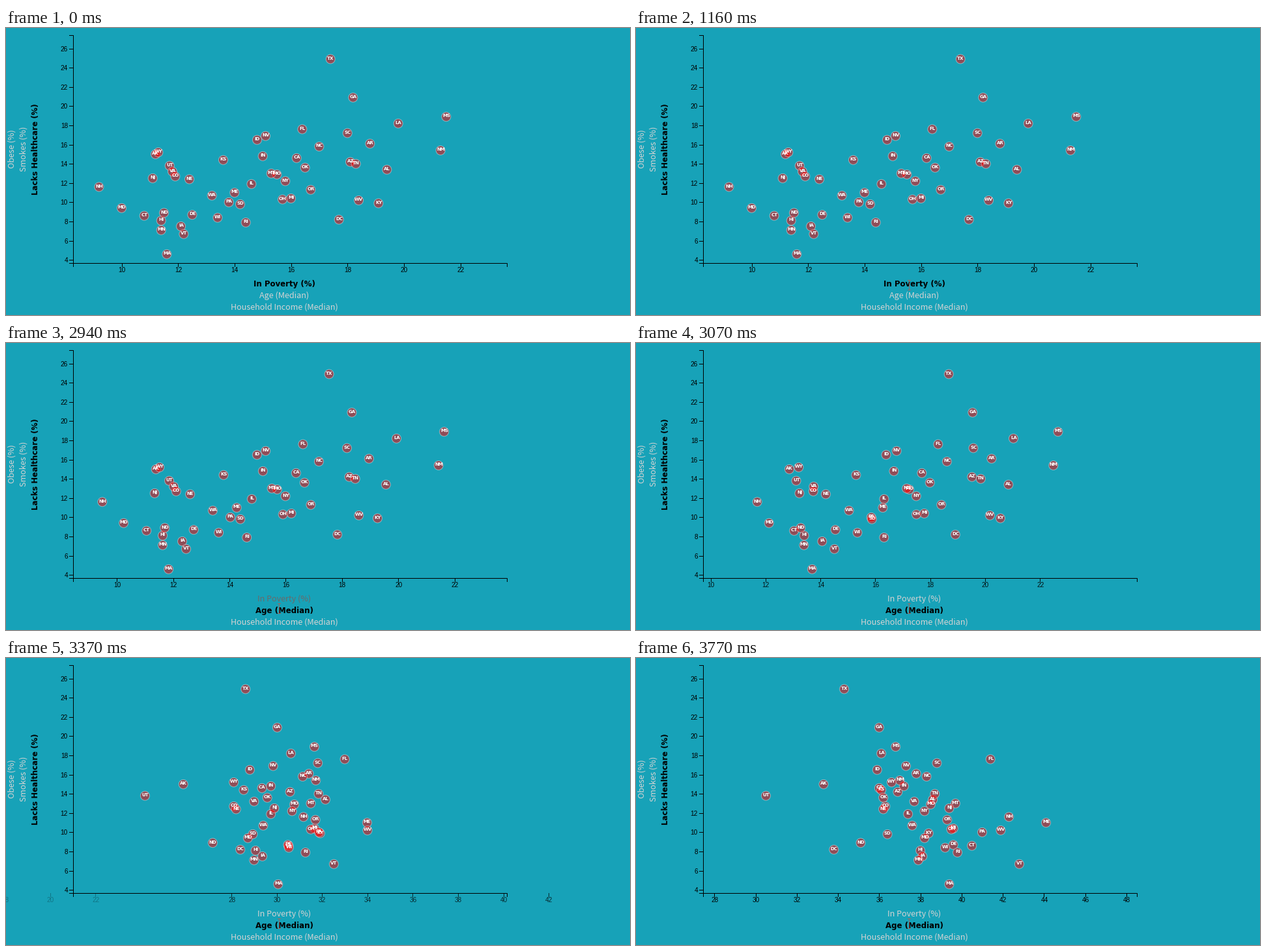
Recreate the animation shown at these times as a matplotlib script. Size 958x442 px, loop 8000 ms.

```python
import numpy as np
import matplotlib.pyplot as plt
from matplotlib.animation import FuncAnimation
from matplotlib.patches import Circle, Polygon, Rectangle

W, H, DPI = 958, 442, 100
PX = 72 / DPI
INTERVAL, FRAMES = 40, 200
TEAL, LIGHT = "#17a2b8", 211 / 255
LEFT, RIGHT, TOP, BOTTOM = 103, 769, 11, 362
RADIUS = 7
CAPTURE = 150            # the pointer moves once per this many ms
SWITCH = 2940            # the x axis changes from poverty to age

# states from lowest to highest in each measure
BY_POVERTY = ("NH MD CT NJ AK WY HI MN ND MA UT VA CO IA VT NE DE WA WI KS PA ME SD RI IL ID IN "
              "NV MT MO OH NY MI CA FL OK OR NC TX DC SC AZ GA TN WV AR KY AL LA NM MS")
BY_UNINSURED = ("MA VT MN IA RI HI DC WI CT DE ND MD SD KY PA WV OH MI WA ME OR NH IL NY NE NJ CO "
                "MO MT VA AL OK UT TN AZ KS CA IN AK WY NM NC AR ID NV SC FL LA MS GA TX")
BY_AGE = ("UT AK DC TX ND ID CA GA LA KS NE OK CO SD WY MS AZ NM IN NV IL WA VA AR MN HI IA "
          "NY MD NC KY MO AL TN SC WI OR MA NJ OH DE MI MT RI CT PA FL WV NH VT ME")
STATES = sorted(BY_AGE.split())


def spread(ranking, curve):
    """Value of each state, read off a rank-to-value curve given by a few points."""
    order = ranking.split()
    ranks = [order.index(s) for s in STATES]
    return np.round(np.interp(ranks, list(curve), list(curve.values())), 1)


POVERTY = spread(BY_POVERTY, {0: 9.2, 2: 10.8, 3: 11.1, 11: 11.8, 16: 12.5, 17: 13.2, 25: 14.8,
                              36: 16.7, 40: 18, 44: 18.4, 48: 19.8, 49: 21.3, 50: 21.5})
UNINSURED = spread(BY_UNINSURED, {0: 4.6, 1: 6.7, 4: 7.9, 10: 8.9, 12: 9.8, 17: 10.4, 23: 12.2,
                                  29: 13.2, 40: 15.4, 46: 17.6, 48: 18.9, 49: 20.9, 50: 24.9})
AGE = spread(BY_AGE, {0: 30.5, 1: 33.3, 3: 34.3, 5: 35.9, 12: 36.3, 16: 36.9, 22: 37.7,
                      34: 38.8, 35: 39.2, 43: 39.8, 44: 40.5, 49: 42.8, 50: 44.1})


def linear(value, start, end, low, high):
    return start + (value - low) / (high - low) * (end - start)


def poverty_x(v):
    return linear(v, LEFT, RIGHT, POVERTY.min() * .9, POVERTY.max() * 1.1)


def age_x(v):
    return linear(v, LEFT, RIGHT, AGE.min() * .9, AGE.max() * 1.1)


def uninsured_y(v):
    return linear(v, BOTTOM, TOP, UNINSURED.min() * .8, UNINSURED.max() * 1.1)


def crisp(v):
    return np.floor(v + .5) + .5


def progress(ms):
    if ms < SWITCH:
        return 0
    step = (ms - SWITCH + 10) // 140
    t = min(.143 + .15 * step, 1)
    return 4 * t ** 3 if t < .5 else 1 - 4 * (1 - t) ** 3


def pointer_y(ms):
    captured = 130 + (ms - 130) // CAPTURE * CAPTURE
    path = {130: 436, 280: 419, 430: 406, 580: 404, 880: 393, 1160: 395, 1310: 403, 1630: 409}
    return np.interp(captured, list(path), list(path.values()))


def hovered(ms):
    y = pointer_y(ms)
    return "age" if 402 <= y < 418 else "income" if 418 <= y < 435 else None


def hover_amount(name, ms):
    """Half way through the fade in the step after the pointer enters or leaves."""
    return ((hovered(ms) == name) + (hovered(ms - CAPTURE) == name)) / 2


fig = plt.figure(figsize=(W / DPI, H / DPI), dpi=DPI, facecolor=TEAL)
ax = fig.add_axes([0, 0, 1, 1])
ax.set(xlim=(0, W), ylim=(H, 0))
ax.axis("off")
svg_area = Rectangle((0, 0), 838, H, transform=ax.transData)


def line(xs, ys, color="black", **kw):
    return ax.plot(xs, ys, color=color, lw=PX, snap=False, solid_capstyle="butt",
                   solid_joinstyle="miter", **kw)[0]


def text(x, y, s, size, family, **kw):
    kw = {"ha": "center", "va": "baseline", "rotation_mode": "anchor", **kw}
    return ax.text(x, y, s, fontsize=size * PX, family=family, **kw)


def style(item, active, hover=0):
    item.set_family("DejaVu Sans" if active else "Noto Sans CJK JP")
    item.set_fontweight("bold" if active else "normal")
    item.set_fontsize((11.8 if active else 12.6) * PX)
    item.set_color("black" if active else (LIGHT * (1 - hover),) * 3)


def label(x, y, s, active=False, **kw):
    item = text(x, y, s, 12, "DejaVu Sans", **kw)
    style(item, active)
    return item


# axes
line([LEFT - 6, LEFT + .5, LEFT + .5, LEFT - 6], [TOP + .5, TOP + .5, BOTTOM + .5, BOTTOM + .5])
line([LEFT + .5, LEFT + .5, RIGHT + .5, RIGHT + .5], [BOTTOM + 6, BOTTOM + .5, BOTTOM + .5, BOTTOM + 6])
for value in range(4, 27, 2):
    y = crisp(uninsured_y(value))
    line([LEFT - 6, LEFT], [y, y])
    text(95, y + 3.3, str(value), 10, "Liberation Sans", ha="right")


def make_ticks(values):
    ticks = []
    for v in values:
        mark = line([0, 0], [BOTTOM, BOTTOM + 6])
        name = text(0, 376.5, str(v), 10, "Liberation Sans", clip_on=True)
        for part in (mark, name):
            part.set_clip_path(svg_area)
        ticks.append((v, mark, name))
    return ticks


old_ticks = make_ticks(range(10, 23, 2))
new_ticks = make_ticks(range(28, 49, 2))

# axis titles
poverty_label = label(427.5, 398, "In Poverty (%)", True)
age_label = label(427.5, 416, "Age (Median)")
income_label = label(427.5, 434, "Household Income (Median)")
label(13, 186.5, "Obese (%)", rotation=90)
label(31, 186.5, "Smokes (%)", rotation=90)
label(49, 186.5, "Lacks Healthcare (%)", True, rotation=90)

# bubbles; one colour per bubble keeps their centres off the pixel grid
cy = uninsured_y(UNINSURED)
start_x, end_x = poverty_x(POVERTY), age_x(AGE)
bubbles = ax.scatter(start_x, cy, s=(2 * RADIUS * PX) ** 2, facecolor=[(1, 0, 0, .52)] * len(cy),
                     edgecolor=[(.89, .89, .89, .5)] * len(cy), linewidth=PX, zorder=3)
names = [text(x, y + .8, s, 7, "DejaVu Sans", weight="bold", color="white", zorder=5)
         for x, y, s in zip(start_x, cy, STATES)]
lenses = []

# cursors: the hand is a raised finger, three knuckles, a palm and a thumb
HAND = np.array([(6, 2), (7.5, .7), (9, 2), (9, 7), (12, 7.5), (15, 8.5), (17, 11), (17, 16),
                 (15, 20), (15, 23.5), (6, 23.5), (6, 20.5), (.6, 13), (1, 11), (3, 11), (6, 14)])
hand = Polygon(HAND, facecolor="white", edgecolor="black", lw=PX, zorder=8)
ax.add_patch(hand)
knuckles = [line([0, 0], [0, 0], zorder=9) for _ in range(3)]
beam = line([], [], (.8, .33, .27), zorder=8, alpha=.75)


def place_cursor(ms):
    y = pointer_y(ms)
    over_link = hovered(ms) is not None and ms < SWITCH
    hand.set_visible(over_link)
    hand.set_xy(HAND + (411, y))
    for k, knuckle in enumerate(knuckles):
        knuckle.set_visible(over_link)
        knuckle.set_data([420.5 + 3 * k] * 2, [y + 7 + k, y + 12])
    beam.set_visible(ms >= 130 and not over_link)
    beam.set_data([417, 422, np.nan, 419.5, 419.5, np.nan, 417, 422],
                  np.array([-7.5, -7.5, 0, -8, 8, 0, 7.5, 7.5]) + y)


def place_bubbles(p):
    xs = start_x + (end_x - start_x) * p
    bubbles.set_offsets(np.column_stack([xs, cy]))
    for name, x in zip(names, xs):
        name.set_x(x + .3)
    while lenses:
        lenses.pop().remove()
    for i in range(len(xs)):
        for j in range(i):
            if np.hypot(xs[i] - xs[j], cy[i] - cy[j]) < 2 * RADIUS - 1:
                lens = Circle((xs[i], cy[i]), RADIUS - .5, color=(.9, .14, .14, .45), lw=0, zorder=4)
                ax.add_patch(lens)
                lens.set_clip_path(Circle((xs[j], cy[j]), RADIUS - .5, transform=ax.transData))
                lenses.append(lens)


def place_ticks(p):
    for ticks, alpha in ((old_ticks, 1 - p), (new_ticks, p)):
        for v, mark, name in ticks:
            x = poverty_x(v) + (age_x(v) - poverty_x(v)) * p
            mark.set_xdata([crisp(x)] * 2)
            name.set_x(x + .5)
            for part in (mark, name):
                part.set_alpha(alpha)
                part.set_visible(alpha > 0 and -10 < x < 850)


def update(frame):
    ms = frame * INTERVAL + INTERVAL - 10
    p = progress(ms)
    place_bubbles(p)
    place_ticks(p)
    place_cursor(ms)
    by_age = ms >= SWITCH
    style(poverty_label, not by_age, .5 if p < .02 else 0)
    style(age_label, by_age, hover_amount("age", ms))
    style(income_label, False, hover_amount("income", ms))
    return []


anim = FuncAnimation(fig, update, frames=FRAMES, interval=INTERVAL, init_func=lambda: [],
                     repeat=True, repeat_delay=0, blit=False)
plt.show()
```
